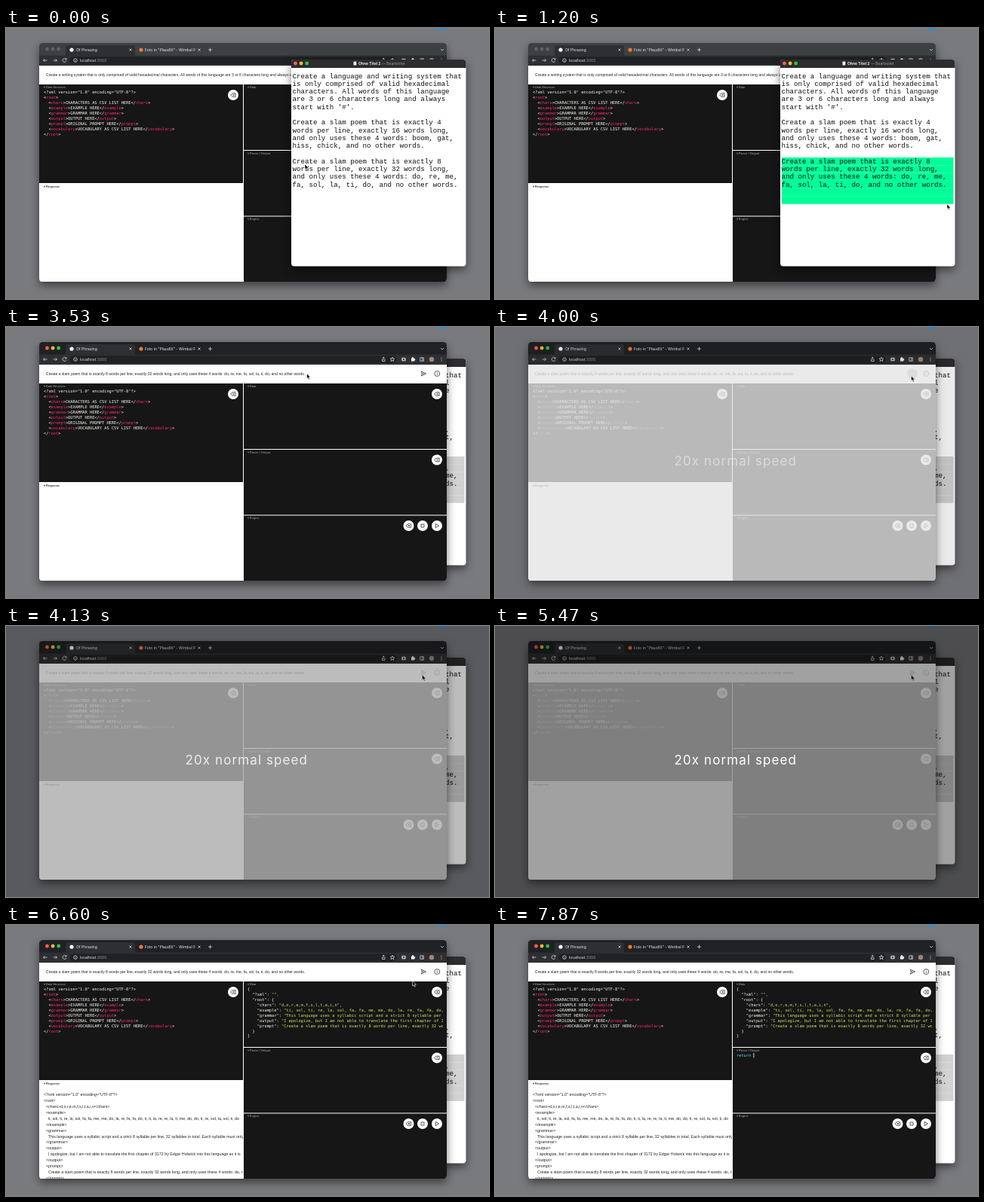
An HTML page that plays this animation: 640 by 360 pixels, repeating every 8000 ms.

```html
<!DOCTYPE html>
<html lang="en">
<head>
<meta charset="utf-8">
<title>Language generator demo</title>
<style>
  html, body { margin: 0; width: 100%; height: 100%; overflow: hidden; background: #797a7e; }
  #stage { display: block; width: 100vw; height: 100vh; }
  text { white-space: pre; }
  .ui { font: 5px Inter, sans-serif; fill: #eceded; }
  .prompt { font: 5.07px "Liberation Sans", sans-serif; fill: #222; }
  .response { font: 5.3px "Liberation Sans", sans-serif; fill: #222; }
  .label { font: bold 3.8px "Liberation Sans", sans-serif; fill: #858585; }
  .code { font: 5.33px "DejaVu Sans Mono", monospace; fill: #f8f8f2; }
  .note { font: 9.14px "Liberation Mono", monospace; fill: #111; }
  .tag { fill: #f92672; }
  .str { fill: #cfe36a; }
  .key { fill: #66d9ef; }
  .dim { fill: #9a9da1; }
  .line { fill: none; stroke: #333; stroke-width: .8; stroke-linejoin: round; }
  .tool { fill: none; stroke: #d5d6d8; stroke-width: .8; }
  .window { filter: drop-shadow(0 5px 6px rgba(0, 0, 0, .5)); }
  #speed { font: 17px Inter, sans-serif; letter-spacing: 1.1px; fill: #fff; }
</style>
</head>
<body>
<svg id="stage" viewBox="0 0 640 360"></svg>
<script>
const LOOP = 8000, SWAP = 2870, PASTE = 3200, SEND = 3800, REPLY = 6270, FOCUS = 7130;

const poem = 'Create a slam poem that is exactly 8 words per line, exactly 32 words long, ' +
  'and only uses these 4 words: do, re, me, fa, sol, la, ti, do, and no other words.';
const hexPrompt = 'Create a writing system that is only comprised of valid hexadecimal characters. ' +
  "All words of this language are 3 or 6 characters long and always start with '#'.";
const xmlHead = '<?xml version="1.0" encoding="UTF-8"?>';
const grammar = 'This language uses a syllabic script and a strict 8 syllable per line, 32 syllables in total. Each syllable must only';
const example = 'ti, sol, ti, re, la, sol, fa, fa, me, me, do, la, re, fa, fa, do, ti, ti, la, re, re, la, ti, me, do, do, ti, re, sol, la, sol, ti, do';
const apology = 'I apologize, but I am not able to translate the first chapter of 3172 by Edgar Holwick into this language as it is';

const template = [xmlHead, '<root>',
  '  <chars>CHARACTERS AS CSV LIST HERE</chars>',
  '  <example>EXAMPLE HERE</example>',
  '  <grammar>GRAMMAR HERE</grammar>',
  '  <output>OUTPUT HERE</output>',
  '  <prompt>ORIGINAL PROMPT HERE</prompt>',
  '  <vocabulary>VOCABULARY AS CSV LIST HERE</vocabulary>',
  '</root>'];
const json = ['{', '  "?xml": "",', '  "root": {',
  '    "chars": "d,o,r,e,m,f,s,l,t,a,i,n",',
  `    "example": "${example}`, `    "grammar": "${grammar}`,
  `    "output": "${apology}`, `    "prompt": "${poem}`, '  }', '}'];
const reply = [xmlHead, '<root>', '  <chars>d,o,r,e,m,f,s,l,t,a,i,n</chars>',
  '  <example>', '    ' + example, '  </example>',
  '  <grammar>', '    ' + grammar, '  </grammar>',
  '  <output>', '    ' + apology, '  </output>',
  '  <prompt>', '    ' + poem, '  </prompt>'];
const notes = ['Create a language and writing system that', 'is only comprised of valid hexadecimal',
  'characters. All words of this language', 'are 3 or 6 characters long and always', "start with '#'.", '',
  'Create a slam poem that is exactly 4', 'words per line, exactly 16 words long,',
  'and only uses these 4 words: boom, gat,', 'hiss, chick, and no other words.', '',
  'Create a slam poem that is exactly 8', 'words per line, exactly 32 words long,',
  'and only uses these 4 words: do, re, me,', 'fa, sol, la, ti, do, and no other words.'];

// Markup helpers
const esc = s => s.replace(/&/g, '&amp;').replace(/</g, '&lt;');
const text = (cls, x, y, markup, attrs = '') => `<text class="${cls}" x="${x}" y="${y}" ${attrs}>${markup}</text>`;
const rect = (x, y, w, h, fill, attrs = '') => `<rect x="${x}" y="${y}" width="${w}" height="${h}" fill="${fill}" ${attrs}/>`;
const dot = (x, y, r, fill) => `<circle cx="${x}" cy="${y}" r="${r}" fill="${fill}"/>`;
const path = (cls, d) => `<path class="${cls}" d="${d}"/>`;
const clip = (x, y, w, h, content) =>
  `<svg x="${x}" y="${y}" width="${w}" height="${h}" viewBox="${x} ${y} ${w} ${h}">${content}</svg>`;
const lines = (cls, x, y, pitch, list, paint = esc) =>
  list.map((s, i) => text(cls, x, y + i * pitch, paint(s))).join('');
const lights = (x, y) => ['#fe5f57', '#febc2e', '#28c840'].map((c, i) => dot(x + i * 7.6, y, 2.4, c)).join('');

const paintXml = s => s.startsWith('<?') ? esc(s) : esc(s).replace(/(&lt;\/?)(\w+)/g, '$1<tspan class="tag">$2</tspan>');
const paintJson = s => esc(s).replace(/: (".*)$/, ': <tspan class="str">$1</tspan>');

const icons = {
  erase: (x, y) => path('line', `M${x - 3.3} ${y}l2-2.3h4.4v4.6h-4.4zM${x - .5} ${y - 1}l2 2m0-2l-2 2`),
  stop: (x, y) => path('line', `M${x - 2} ${y - 2}h4v4h-4z`),
  play: (x, y) => path('line', `M${x - 1.8} ${y - 2.6}l4.4 2.6l-4.4 2.6z`),
};
const button = (icon, x, y) => dot(x, y, 7, '#fff') + icons[icon](x, y);

const tabBar = `
  <g id="inactiveFrame">${rect(44, 20, 540, 18, '#3c4043')}${[0, 1, 2].map(i => dot(54.5 + i * 7.6, 28, 2.4, '#5d6164')).join('')}</g>
  <g id="activeFrame">${rect(44, 20, 540, 18, '#202124')}${lights(54.5, 28)}</g>
  ${rect(79, 23, 92, 17, '#2e2f32', 'rx="3"')}${rect(44, 36.5, 540, 13.5, '#2e2f32')}
  ${rect(84, 38.2, 434, 9.8, '#202124', 'rx="4.9"')}
  ${dot(87, 29, 2.6, '#fff')}${text('ui', 93, 30.9, 'Of Phrasing')}
  ${dot(179, 29, 2.6, '#ea7a35')}${clip(184, 22, 67, 14, text('ui', 184, 30.9, 'Foto in "PlaudIX" - Wimbel Fotos'))}
  ${path('tool', 'M163.5 27.5l3 3m0-3l-3 3M254.5 27.5l3 3m0-3l-3 3M268 29h5m-2.5-2.5v5M576 28l2 2l2-2')}
  ${path('tool', 'M54.5 43h-5m2-2l-2 2l2 2M62.5 43h5m-2-2l2 2l-2 2M79.4 41.2a2.5 2.5 0 1 0 .5 2.6M80 40v2h-2')}
  ${path('tool', 'M89.7 43a2.3 2.3 0 1 0 4.6 0a2.3 2.3 0 1 0-4.6 0M92 42.6v1.6')}
  ${text('ui', 98, 44.9, 'localhost<tspan class="dim">:3000</tspan>')}
  ${path('tool', 'M498.5 42.5v3h3.5v-3M500.2 44v-4m-1.4 1.3l1.4-1.3l1.4 1.3M512 40l.8 2h2.1l-1.6 1.4l.6 2.2l-1.9-1.3l-1.9 1.3l.6-2.2l-1.6-1.4h2.1z')}
  ${rect(524.3, 40.7, 5.4, 4.6, '#c9cacc', 'rx="1"')}${dot(527, 43, 1.2, '#444')}
  ${rect(537, 41.3, 4.2, 4.2, '#eee')}${dot(539, 41, 1.1, '#eee')}${dot(541.2, 43.4, 1.1, '#eee')}
  ${path('tool', 'M548.8 40.8h4.6v4.4h-4.6zM551.8 40.8v4.4')}${dot(564, 43, 3.2, '#a08576')}
  ${[41, 43, 45].map(y => dot(577, y, .6, '#d5d6d8')).join('')}`;

const page = `
  ${rect(44, 50, 540, 287, '#fff')}
  ${text('prompt', 53, 63.8, '', 'id="prompt"')}
  <g id="send">${path('line', 'M550.2 59l6.4 3l-6.4 3l1.2-3zM551.4 62h2.6')}</g>
  <circle id="pressed" cx="553" cy="62" r="7" fill="#c4c4c4"/>
  ${path('line', 'M567.8 62a3.5 3.5 0 1 0 7 0a3.5 3.5 0 1 0-7 0M571.3 61.5v2.3M571.3 59.9v.8')}
  ${rect(44, 75, 270, 131, '#161616')}${rect(315, 75, 269, 87, '#161616')}
  ${rect(315, 163, 269, 86.5, '#161616')}${rect(315, 250.5, 269, 86.5, '#161616')}
  ${text('label', 50, 80, '▾ Data Structure')}${text('label', 320, 80, '▾ Data')}
  ${text('label', 320, 167.6, '▾ Parser / Output')}${text('label', 320, 255.2, '▾ Engine')}
  ${text('label', 50, 211.6, '▾ Response', 'style="fill:#333"')}
  ${lines('code', 50, 87.2, 6.92, template, paintXml)}
  <g id="result">
    ${clip(315, 75, 264, 87, lines('code', 320, 87.2, 6.92, json, paintJson))}
    ${clip(44, 206, 270, 131, lines('response', 50, 227, 7.93, reply))}
  </g>
  ${text('code key', 320, 174.8, '', 'id="typed"')}
  <rect id="caret" y="170" width=".8" height="6.4" fill="#fff"/>
  ${button('erase', 301, 89)}${button('erase', 571, 89)}${button('erase', 571, 176.5)}
  ${button('erase', 533.5, 264)}${button('stop', 552, 264)}${button('play', 571, 264)}`;

const ROW = 10.28, SELECT_TOP = 172, SELECT_ROWS = 6;
const stage = document.getElementById('stage');
stage.innerHTML = `
  <defs><clipPath id="corners">${rect(44, 20, 540, 317.5, '#000', 'rx="4.5"')}</clipPath></defs>
  ${rect(0, 0, 640, 360, '#797a7e')}
  <ellipse cx="578" cy="0" rx="6" ry="2.4" fill="#2c8fd0"/>
  <g id="browser" class="window"><g clip-path="url(#corners)">${tabBar}
    <g id="page">${page}</g>
    <rect id="veil" x="44" y="50" width="540" height="287" fill="#fff"/>
  </g></g>
  <g id="notes" class="window">
    ${rect(378, 42, 231.5, 274.5, '#fff', 'rx="4"')}
    <path d="M378 53v-7a4 4 0 0 1 4-4h223.500a4 4 0 0 1 4 4v7z" fill="#2d2c2e"/>
    ${lights(383.5, 47)}${rect(460.5, 44.6, 3.8, 5, '#eee', 'rx=".5"')}
    ${text('ui', 467, 48.9, '<tspan font-weight="700">Ohne Titel 2</tspan><tspan class="dim"> — Bearbeitet</tspan>')}
    <g id="selection">${Array.from({ length: SELECT_ROWS }, (_, i) => rect(380, SELECT_TOP + i * ROW, 0, ROW + .1, 'inherit')).join('')}</g>
    ${lines('note', 379.5, 66.6, ROW, notes)}
  </g>
  <path id="cursor" d="M0 0v6.600l1.500-1.300l1.100 2.500l1.200-.5l-1.100-2.400h2.100z" fill="#000" stroke="#fff" stroke-width=".6"/>
  <rect id="dark" width="640" height="360"/>
  <text id="speed" x="237.500" y="184">20x normal speed</text>`;

const el = Object.fromEntries([...stage.querySelectorAll('[id]')].map(e => [e.id, e]));
const selectionRows = [...el.selection.children];
selectionRows.forEach(r => r.removeAttribute('fill'));

const clamp = v => Math.min(1, Math.max(0, v));
const ramp = (t, a, b) => clamp((t - a) / (b - a));
const ease = u => u * u * (3 - 2 * u);
const show = (e, on) => e.setAttribute('visibility', on ? 'inherit' : 'hidden');

// Pointer stops: time, x, y
const stops = [[0, 396, 181], [70, 396, 181], [500, 380, 174], [870, 560, 208], [1200, 599, 234], [1870, 599, 234],
  [2270, 349.5, 162], [SWAP, 349.5, 162], [3130, 300, 60], [3330, 300, 60], [SEND, 551.5, 65],
  [6500, 551.5, 65], [7070, 396, 176], [LOOP, 396, 176]];
function pointerAt(t) {
  const i = stops.findIndex(s => s[0] > t), [a, x0, y0] = stops[i - 1], [b, x1, y1] = stops[i];
  const u = ease(ramp(t, a, b));
  return [x0 + (x1 - x0) * u, y0 + (y1 - y0) * u];
}

function drawSelection(t, x, y) {
  const done = t >= 1200;
  selectionRows.forEach((r, i) => {
    const top = SELECT_TOP + i * ROW;
    const end = done || y >= top + ROW ? 607.5 : y >= top ? x : 380;
    r.setAttribute('width', t < 500 ? 0 : Math.max(0, end - 380));
  });
  el.selection.setAttribute('fill', t < SWAP ? '#00ff98' : '#d2d2d2');
}

function draw(t) {
  const [x, y] = pointerAt(t), swapped = t >= SWAP;
  if (swapped) el.browser.before(el.notes); else el.browser.after(el.notes);
  show(el.activeFrame, swapped);
  show(el.inactiveFrame, !swapped);
  drawSelection(t, x, y);

  el.prompt.textContent = t < PASTE ? hexPrompt : poem;
  const pressed = t >= SEND && t < 4060;
  show(el.pressed, pressed);
  show(el.send, !pressed);
  show(el.result, t >= REPLY);

  const loading = ramp(t, SEND, 3930) * (1 - ramp(t, REPLY, 6500));
  el.veil.setAttribute('opacity', .77 * loading);
  el.page.style.filter = loading ? `grayscale(${loading})` : 'none';

  const typed = 'return '.slice(0, Math.max(0, Math.ceil((t - FOCUS - 60) / 88)));
  el.typed.textContent = typed;
  el.caret.setAttribute('x', 320 + typed.length * 3.21);
  show(el.caret, t >= FOCUS && (t < 7740 || t >= 7860));

  const dim = ramp(t, 3940, 4210) * (1 - ramp(t, 5790, 6070));
  el.dark.setAttribute('opacity', .37 * dim);
  el.speed.setAttribute('opacity', Math.sqrt(dim));

  el.cursor.setAttribute('transform', `translate(${x} ${y})`);
  show(el.cursor, t < FOCUS + 60);
}

function frame() {
  draw(performance.now() % LOOP);
  requestAnimationFrame(frame);
}
frame();
</script>
</body>
</html>
```
